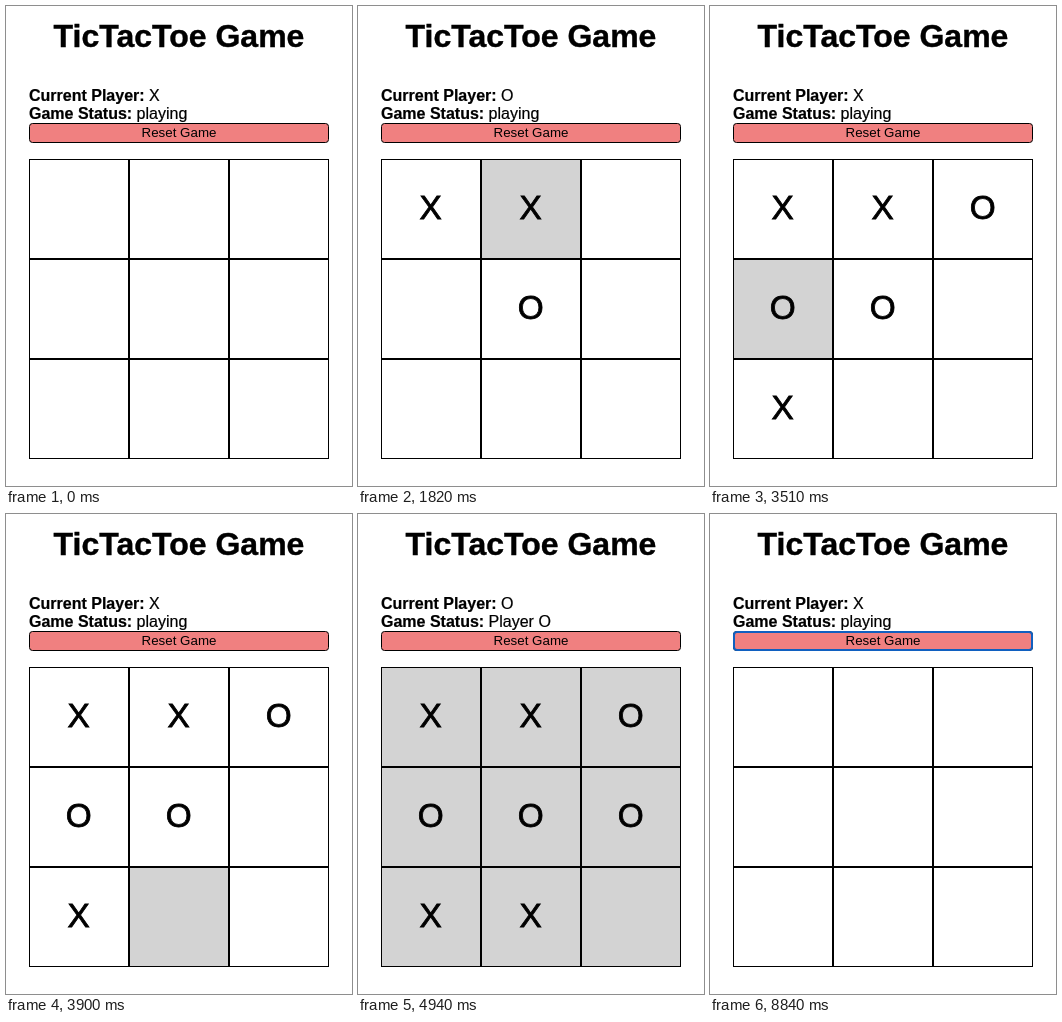
Animation, 346 px wide and 480 px high, one loop 9230 ms. Source, as an HTML page:

```html
<!DOCTYPE html>
<html lang="en">
<head>
<meta charset="utf-8">
<title>TicTacToe Game</title>
<style>
  html, body { margin: 0; width: 100%; height: 100%; overflow: hidden; background: #fff; }
  svg { display: block; width: 346px; height: 480px; }
  text {
    font: 16px "Liberation Sans", Arial, sans-serif;
    white-space: pre;
    stroke: #000;
    stroke-width: 0.2px;
  }
  .title { font-size: 32px; font-weight: bold; stroke-width: 0.4px; }
  .label { font-weight: bold; }
  .reset { font-size: 13.333px; stroke-width: 0; }
  .mid { text-anchor: middle; }
  .cell rect { fill: #fff; stroke: #000; }
  .cell.shade rect { fill: #d3d3d3; }
  .cell text { font-size: 33.333px; text-anchor: middle; stroke-width: 0.8px; }
  #button { fill: #f08080; stroke: #000; }
  #ring { fill: none; stroke: #1060c0; stroke-width: 2; }
</style>
</head>
<body>
<svg id="stage" viewBox="0 0 346 480">
  <text class="title mid" x="173" y="40.5">TicTacToe Game</text>
  <text x="23" y="95"><tspan class="label">Current Player:</tspan><tspan id="player"> X</tspan></text>
  <text x="23" y="113"><tspan class="label">Game Status:</tspan><tspan id="status"> playing</tspan></text>
  <rect id="button" x="23.5" y="117.5" width="299" height="19" rx="3"/>
  <rect id="ring" x="24" y="118" width="298" height="18" rx="3"/>
  <text class="reset mid" x="173" y="131">Reset Game</text>
</svg>
<script>
// Times are counted in ticks of 130 ms
const TICK = 130, LOOP = 71, ENTER = 3, RESET = 60, LEAVE = 64, GONE = 68;
const CENTER = 4, ENTRY = 3, EXIT = 7;

const row = cell => Math.floor(cell / 3);
const col = cell => cell % 3;

// Each turn: the cell and the tick it is clicked; X starts
const turns = [[0, 6], [4, 10], [1, 14], [2, 18], [6, 24], [3, 27], [7, 31], [5, 38]]
  .map(([cell, click], i, all) => {
    const from = i ? all[i - 1][0] : ENTRY;
    const rows = Math.abs(row(cell) - row(from));
    return {
      cell, click,
      mark: "XO"[i % 2],
      start: click - 2 * Math.max(1, rows),
      diagonal: rows > 0 && col(cell) !== col(from)
    };
  });
const WIN = turns[turns.length - 1].click;

// Cell under the pointer; diagonal moves cross the center for one tick
function pointer(tick) {
  if (tick < ENTER || tick >= GONE) return -1;
  if (tick >= LEAVE) return tick < LEAVE + 1 ? CENTER : EXIT;
  if (tick >= RESET) return -1;
  const turn = turns.filter(t => t.start <= tick).pop();
  if (!turn) return ENTRY;
  return turn.diagonal && tick < turn.start + 1 ? CENTER : turn.cell;
}

const $ = id => document.getElementById(id);

function add(parent, tag, attrs) {
  const el = document.createElementNS("http://www.w3.org/2000/svg", tag);
  for (const key in attrs) el.setAttribute(key, attrs[key]);
  return parent.appendChild(el);
}

const cells = Array.from({ length: 9 }, (_, i) => {
  const x = 23 + 100 * col(i), y = 153 + 100 * row(i);
  const box = add($("stage"), "g", { class: "cell" });
  add(box, "rect", { x: x + 0.5, y: y + 0.5, width: 99, height: 99 });
  return { box, mark: add(box, "text", { x: x + 49.7, y: y + 59.7 }) };
});

function setText(el, value) {
  if (el.textContent !== value) el.textContent = value;
}

function draw(tick) {
  const reset = tick >= RESET, won = tick >= WIN && !reset;
  const played = reset ? [] : turns.filter(t => t.click <= tick);
  const hover = pointer(tick);

  cells.forEach((c, i) => {
    const turn = played.find(t => t.cell === i);
    setText(c.mark, turn ? turn.mark : "");
    c.box.classList.toggle("shade", won || i === hover);
  });
  setText($("player"), won ? " O" : " " + "XO"[played.length % 2]);
  setText($("status"), won ? " Player O" : " playing");
  $("ring").style.display = reset ? "" : "none";
}

const begin = performance.now();
function frame() {
  draw((performance.now() - begin) / TICK % LOOP);
  requestAnimationFrame(frame);
}
frame();
</script>
</body>
</html>
```
